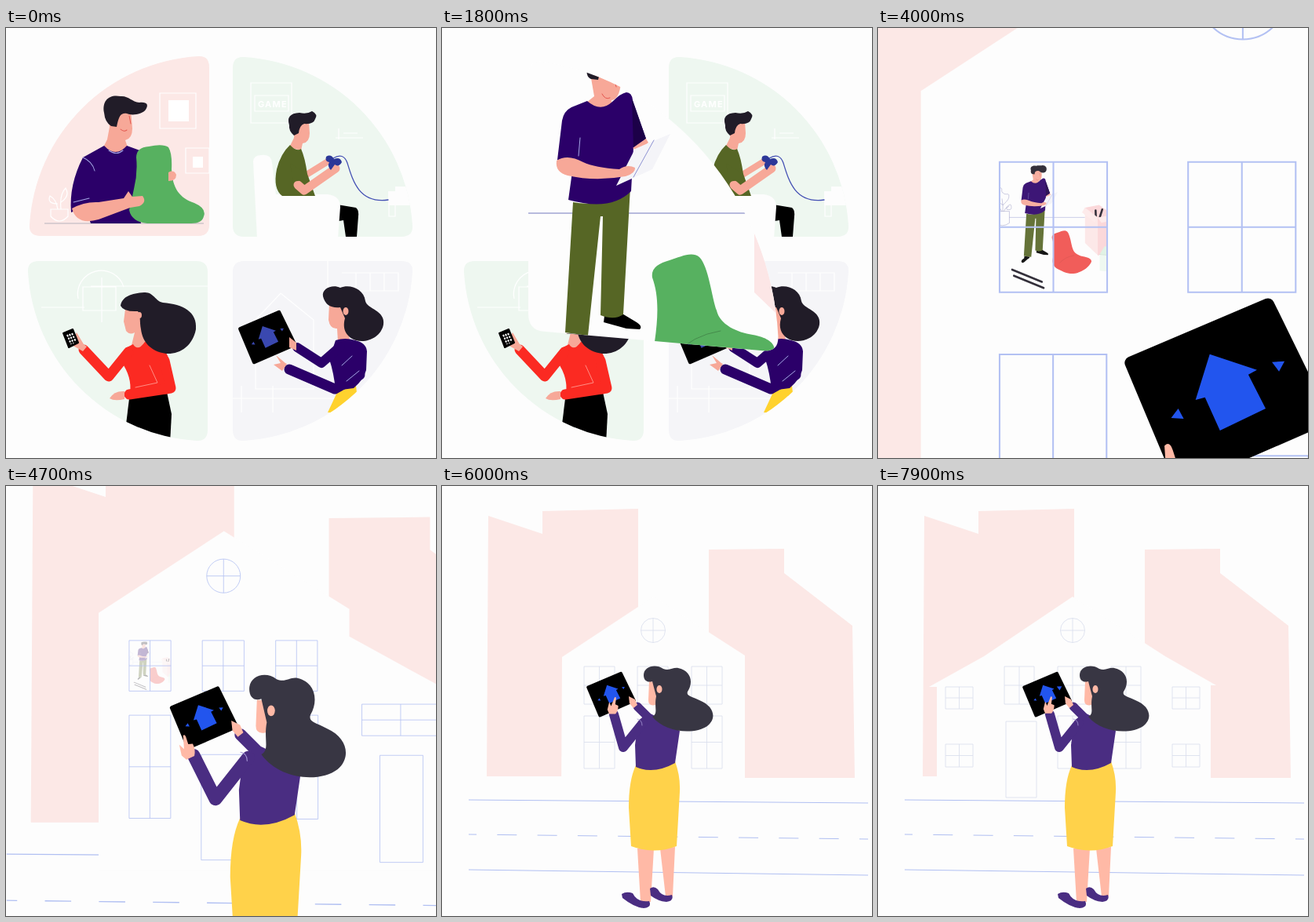
Animation of 548x548 px, one loop 8 s. Source, as an HTML page:

```html
<!DOCTYPE html>
<html lang="en">
<head>
<meta charset="utf-8">
<title>Home illustration loop</title>
<style>
html,body{margin:0;height:100%;overflow:hidden;background:#fdfdfd}
svg{display:block;width:100vw;height:100vh}
.skin{fill:#f7a898}.navy{fill:#2b0069}.hair{fill:#211c28}.olive{fill:#566625}
.pale{fill:#ffb9a6}.plum{fill:#4a2d82}.dark{fill:#383643}.paper{fill:#fdfdfd}
.line{fill:none;stroke-linecap:round;stroke-linejoin:round}
.faint{fill:none;stroke:#fff;stroke-width:1.2}
.pink{fill:#fce8e6}
</style>
</head>
<body>
<svg viewBox="0 0 548 548">
<defs>
  <path id="sector" d="M0-14V-215Q0-230-14-229A229 229 0 0 0-229-14Q-230 0-215 0H-14Q0 0 0-14Z"/>
  <clipPath id="cMain"><use href="#sector" id="mainSector"/></clipPath>
  <clipPath id="cTR"><use href="#sector" transform="translate(289 266) scale(-1 1)"/></clipPath>
  <clipPath id="cBL"><use href="#sector" transform="translate(257 297) scale(1 -1)"/></clipPath>
  <clipPath id="cBR"><use href="#sector" transform="translate(289 297) scale(-1)"/></clipPath>
  <clipPath id="cWin"><rect id="winRect"/></clipPath>

  <g id="tablet">
    <path d="M324 429L498 355 569 500 387 579Z" stroke="#000" stroke-width="16" stroke-linejoin="round"/>
    <g fill="var(--glow,#2255ee)">
      <path d="M424 418L484 438 473 444 495 487 437 515 418 473 406 476Z"/>
      <path d="M384 487L391 500 375 499Z"/>
      <path id="arrow" d="M503 428L519 427 512 440Z"/>
    </g>
  </g>

  <g id="room">
    <path d="M33 236H398" stroke="#7378bd" stroke-width="1.2"/>
    <g class="line" stroke="#55559f">
      <path d="M74 212Q76 190 71 163M74 186C60 180 52 170 56 160C58 145 42 140 46 132C48 122 62 126 66 120C75 122 64 136 76 140C84 150 98 138 98 150C99 168 86 174 76 186Z"/>
      <path d="M70 212Q64 196 44 178M62 194C60 206 40 204 38 192C38 182 26 180 19 166C22 158 34 160 40 158C46 168 38 176 54 174C64 178 62 184 62 194Z"/>
      <path d="M78 212Q80 200 98 192M90 204C86 196 92 190 104 185C108 190 110 202 104 205Z"/>
      <path class="paper" d="M45 212H100V258Q72 279 45 258Z"/>
    </g>
    <path fill="#fbd5d7" d="M398 198L454 187 508 226 506 367 449 386Z"/>
    <path class="line" stroke="#211c28" stroke-width="8" d="M440 209L441 234M466 205L457 234"/>
    <path fill="#fce6e6" d="M398 205L449 237V386L398 337Z"/>
    <path fill="#fbd5d7" d="M449 237L506 225V367L449 386Z"/>
    <path fill="#fdeaea" stroke="#fbdcdc" stroke-width=".5" d="M398 197L387 216 436 257 449 237ZM449 237L505 225 522 243 463 257Z"/>
    <path fill="#eef8f0" d="M456 382L520 389V452L456 446Z"/>
    <path fill="#b8e2c4" d="M520 389L536 356V412L520 452Z"/>
    <path fill="#dff1e3" d="M456 382L475 350 536 355 520 389Z"/>
    <path class="line" stroke="#c4d2c8" stroke-width="1.5" d="M506 352L487 387M456 382L520 389"/>
    <path class="line" stroke="#211c28" stroke-width="8" d="M111 442L228 490M118 466L235 514"/>
    <path fill="currentColor" d="M268 318C266 306 276 300 290 296C304 292 318 284 328 292C340 304 344 345 350 360C354 378 376 388 396 391C414 394 426 402 423 412C410 440 370 462 335 457C320 455 310 448 296 442C276 434 268 418 271 400C276 365 276 340 268 318Z"/>
    <path class="line" stroke="#000" stroke-opacity=".22" d="M298 416Q318 392 355 386"/>
    <path d="M159 389L181 391Q180 398 172 400L158 413Q148 418 147 409Q148 402 158 397ZM207 367L228 363 248 375Q256 380 252 384L235 383 206 375Z"/>
    <path class="olive" d="M167 222Q205 230 240 203L231 365Q220 373 202 366L205 240H202L186 392 157 388Z"/>
    <path class="skin" d="M198 56Q212 44 227 58L228 70Q226 91 216 92L217 101Q203 109 184 95L194 87 190 64Z"/>
    <path class="line" stroke="#e2574f" d="M204 84Q208 92 214 89M219 62L222 75"/>
    <path class="hair" d="M185 50C180 38 190 30 206 33C214 29 222 33 230 31C242 30 249 40 246 50C243 62 230 62 222 57C214 49 204 52 201 58L199 66 190 65C184 62 184 56 185 50Z"/>
    <path class="navy" d="M185 93Q202 108 217 94Q228 83 235 82Q242 82 243 92L260 141 244 153 241 208Q215 234 161 219L166 183 147 168 153 118Q155 106 165 101Z"/>
    <path fill="#1c0048" d="M242 90L260 141 244 152Z"/>
    <path class="line" stroke="#a5a8e6" d="M176 140L174 163"/>
    <path class="skin" d="M243 153L260 141 263 146 250 157Z"/>
    <path fill="#f4f4f8" d="M246 154L291 135 268 180 222 201Z"/>
    <path class="line" stroke="#8d92d2" d="M270 143L244 190"/>
    <path class="skin" d="M146 169Q160 160 180 171Q195 178 226 180Q236 173 246 178Q247 185 234 189Q195 196 160 188Q144 184 146 169Z"/>
  </g>
</defs>

<g id="cards">
  <g clip-path="url(#cTR)">
    <path fill="#eef7f0" d="M289 36H522V266H289Z"/>
    <path class="faint" d="M312 70H364V121H312ZM317 86H360V106H317ZM420 140H455M430 134H448M424 128V142M488 226V240H496V226"/>
    <text x="321" y="101" font-family="Inter,Arial,sans-serif" font-weight="700" font-size="11" letter-spacing="1.2" fill="#fff">GAME</text>
    <path class="paper" d="M487 208H521V226H487ZM496 202H511V209H496Z"/>
    <path d="M422 225L446 229Q450 232 449 240L447 266H433L430 245 424 246Z"/>
    <path class="paper" d="M320 268L315 170Q316 162 325 162Q338 160 339 172L344 212H410Q426 214 426 228L423 268Z"/>
    <g id="gamer">
      <path class="line" stroke="#4450b4" stroke-width="1.3" d="M417 166Q430 158 435 172C442 195 450 224 487 219"/>
      <path class="line" stroke="#f7a898" stroke-width="8" d="M378 190L412 169"/>
      <path class="skin" d="M368 120H386L387 134Q387 146 378 147L376 156 361 152 367 140Z"/>
      <path class="hair" d="M361 124Q356 109 374 108Q384 110 390 106Q398 110 394 116Q392 123 380 122Q374 124 373 134L367 137Q360 131 361 124Z"/>
      <path class="olive" d="M362 149Q370 158 376 154Q381 165 384 186L394 214H352Q340 205 345 180Q350 160 362 149Z"/>
      <path class="line" stroke="#f7a898" stroke-width="11" d="M372 200L380 207 420 179"/>
      <path class="olive" d="M362 172L384 186 383 193 366 196Z"/>
      <path fill="#2c3798" d="M408 164Q414 160 418 167Q426 164 428 171Q424 178 419 174L414 181Q409 176 412 171Q406 170 408 164Z"/>
    </g>
  </g>

  <g clip-path="url(#cBL)">
    <path fill="#eef7f0" d="M28 296H258V526H28Z"/>
    <path class="faint" d="M45 356H100M108 329H257M92 345A30 30 0 0 1 150 330M122 318V375M98 330H140V360H98Z"/>
    <path d="M158 464H205L211 492 209 530H150Z"/>
    <path class="skin" d="M152 358L150 374 153 386Q158 392 164 388L160 404 170 414 180 400 174 360Z"/>
    <path fill="#fb2a22" d="M152 408L162 403Q168 413 177 400Q200 402 207 420L208 466 157 470Q162 450 150 430Z"/>
    <path class="line" stroke="#fb2a22" stroke-width="13" d="M202 424L210 459 157 467"/>
    <path class="line" stroke="#ff8d84" d="M183 430L193 452 165 458"/>
    <path class="skin" d="M151 463V473Q138 476 132 472Q138 462 151 463Z"/>
    <path class="hair" d="M146 354C148 342 160 338 176 337C188 336 190 348 200 350C226 352 244 362 242 384C238 405 222 416 204 415C184 412 174 400 172 384C170 374 172 366 168 361Q150 362 146 354Z"/>
    <ellipse class="skin" cx="170" cy="366" rx="3" ry="4"/>
    <g id="phone">
      <path class="line" stroke="#fb2a22" stroke-width="13" d="M156 413L131 444 99 410"/>
      <path class="skin" d="M98 412L82 403 90 388 99 403 103 406Z"/>
      <path d="M73 389L85 384 92 401 80 407Z" stroke="#000" stroke-width="2" stroke-linejoin="round"/>
      <path fill="none" stroke="#fff" stroke-width="2" stroke-dasharray="2.5 1.5" d="M78 391L83 403M81 390L86 402M84 389L89 400"/>
    </g>
  </g>

  <g clip-path="url(#cBR)">
    <path fill="#f5f5f8" d="M288 296H518V526H288Z"/>
    <path class="faint" d="M410 297V340M428 312H500V335H428M446 312V335M464 312V335M482 312V335M500 312V335M318 372L350 338 392 372V460H318ZM289 472H440M300 456V490M340 456V490"/>
    <path fill="#ffd22e" d="M424 460L446 456 450 490H410Z"/>
    <path class="skin" d="M412 350L411 372Q413 384 422 383L423 400H438L434 354Z"/>
    <path class="navy" d="M420 398Q432 394 445 398Q459 401 460 412L459 436Q456 448 443 459L420 462Q418 440 412 422Z"/>
    <path class="hair" d="M404 342C402 332 416 326 426 331C438 326 456 332 458 348C460 358 484 360 481 378C478 394 460 402 446 398C434 394 428 384 432 370L426 356Q408 358 404 342Z"/>
    <ellipse class="skin" cx="433" cy="361" rx="3.500" ry="5"/>
    <g id="pad">
      <path class="line" stroke="#2b0069" stroke-width="12" d="M426 406L402 427 371 407"/>
      <use href="#tablet" style="--glow:#3a48b0" transform="matrix(.285 0 0 .285 206 261)"/>
      <path class="skin" d="M361 394L370 401 370 411 361 407Z"/>
      <path class="line" stroke="#2b0069" stroke-width="13" d="M451 442L419 460 361 435"/>
      <path class="skin" d="M358 428L352 437 341 429 350 427 344 417 356 427Z"/>
    </g>
    <path class="line" stroke="#a5a8e6" d="M428 430L441 418M434 450L450 437"/>
  </g>

  <g clip-path="url(#cMain)">
    <path class="paper" d="M0 0H548V548H0Z"/>
    <path class="pink" id="tint" d="M0 0H548V548H0Z"/>
    <g id="held">
      <path class="faint" d="M196 83H242V128H196ZM229 153H259V185H229ZM57 231H79V240Q68 252 57 240ZM66 231Q64 218 56 214Q52 224 66 224M70 231Q68 212 76 204Q82 214 70 222"/>
      <path fill="#fff" d="M207 92H233V119H207ZM238 164H251V178H238Z"/>
      <path d="M49 249H252" stroke="#b7b3bd"/>
      <g id="bust">
        <path class="skin" d="M130 112L132 126 129 142 124 152Q140 170 155 152L152 143Q161 141 161 128L159 104H140Z"/>
        <path class="line" stroke="#e2574f" d="M146 129Q150 133 154 130M157 112L159 122"/>
        <path class="hair" d="M125 108C122 92 132 84 146 87C156 86 160 94 170 95C180 94 182 98 178 104C174 110 160 112 154 109C146 108 144 112 141 126L134 125Q126 120 125 108Z"/>
        <path class="navy" d="M125 150Q140 166 154 150L176 158 166 215 172 249H108L100 228 83 235Q80 200 98 165Z"/>
        <path class="line" stroke="#a5a8e6" d="M131 156Q141 163 149 156M98 165Q110 170 113 182M86 222L106 217"/>
        <path fill="#57b160" d="M166 165Q166 152 182 151Q200 147 207 152Q212 160 211 180C212 205 222 217 240 223Q256 230 252 240Q250 249 236 249H180Q160 247 157 232Q160 220 163 205Q168 185 166 165Z"/>
        <path class="skin" d="M84 230Q100 221 118 222L150 217 156 208 161 215 174 214Q180 222 170 227L158 229 118 244Q90 252 84 230ZM207 184Q214 180 217 187Q217 195 207 195Z"/>
      </g>
    </g>
    <use href="#room" id="roomIn"/>
  </g>
</g>

<g id="world">
  <path class="paper" d="M0 0H548V548H0Z"/>
  <g id="cam">
    <g id="street">
      <path class="pink" d="M59 38L128 61V32L250 29V370H57ZM340 81L436 80V111L523 178 526 372H340Z"/>
      <g fill="none" stroke="#b0bff2" stroke-width="1">
        <path d="M34 400L543 404M34 489L543 496"/>
        <path stroke-dasharray="25 26.300" stroke-dashoffset="15" d="M34 444L543 450"/>
      </g>
      <g id="house0" transform="matrix(.744 0 0 .747 33.5 50)">
        <path class="paper" d="M118 162L278 58 438 157V192L651 308H640V490H118Z"/>
      </g>
      <path id="house1" class="paper" d="M153 218L269.500 141 386 216V395H152Z"/>
      <path id="house2" class="paper" d="M65 256L135 217 248 141 366 217 431 254H424V395H75V256Z"/>
    </g>
    <g id="roomOut"><g clip-path="url(#cWin)"><use href="#room"/></g></g>
    <g fill="none" stroke-width=".8">
      <path id="panes0" transform="matrix(.744 0 0 .747 33.5 50)" stroke="#b3c1f3"/>
      <path id="panes1" stroke="#d9deec"/>
      <path id="panes2" stroke="#d9deec"/>
    </g>
  </g>
  <g id="woman">
    <path class="pale" d="M249 462L253 530H266L270 462ZM278 462L285 523H294L297 460Z"/>
    <path class="plum" d="M229 520Q235 516 243 519Q249 531 264 529Q268 537 257 538Q245 537 230 525ZM265 513Q270 509 275 514Q281 525 293 521Q296 529 286 530Q275 529 266 522Z"/>
    <path class="pale" d="M264 249L263 273Q263 281 272 279L274 292 282 290 277 250Z"/>
    <path class="line" stroke="#4a2d82" stroke-width="11" d="M272 304L249 281"/>
    <g id="body">
      <path fill="#ffd24a" d="M247 356Q270 365 297 351Q304 370 303 390L299 459Q270 470 241 459L238 410Q238 375 247 356Z"/>
      <path class="plum" d="M258 292Q266 286 280 300L303 312 297 353Q270 368 247 358L246 330 250 300Z"/>
    </g>
    <path id="mane" class="dark" d="M257 241C257 230 272 226 282 233C290 236 294 231 301 232C317 235 321 250 313 262C311 268 318 268 328 273C348 281 350 297 338 306C322 317 285 315 268 294C276 290 270 282 273 268L268 249C262 251 257 248 257 241Z"/>
    <ellipse class="pale" cx="277" cy="259" rx="3.500" ry="5"/>
    <use href="#tablet" transform="matrix(.24 0 0 .24 108.4 153.500)"/>
    <path class="pale" id="grip" d="M238 268L246 272 249 279 244 283 239 277Z"/>
    <path class="line" id="arm" stroke="#4a2d82" stroke-width="12"/>
    <path class="line" stroke="#a79ad6" stroke-width=".8" d="M249 297Q255 298 255 305"/>
    <path class="pale" id="hand" d="M-7 2L-6-8-3-3 0-15Q2-16 2-13L2-6 6-5Q7 1 4 6L-4 7Z"/>
  </g>
</g>
</svg>
<script>
const $ = id => document.getElementById(id);
const set = (id, name, value) => $(id).setAttribute(name, value);
const fade = (id, value) => set(id, 'opacity', value);
const lerp = (a, b, p) => a + (b - a) * p;
const ramp = (t, a, b) => Math.min(1, Math.max(0, (t - a) / (b - a)));
const ease = p => p * p * (3 - 2 * p);

const box = (x, y, w, h) => `M${x} ${y}h${w}v${h}h${-w}z`;
const pane = (x, y, w, h) => box(x, y, w, h) + `M${x + w / 2} ${y}v${h}M${x} ${y + h / 2}h${w}`;
const rose = (x, y, r) => `M${x - r} ${y}a${r} ${r} 0 1 1 ${2 * r} 0a${r} ${r} 0 1 1 ${-2 * r} 0h${2 * r}M${x} ${y - r}v${2 * r}`;

set('panes0', 'd', [157, 250.4, 344].map(x => pane(x, 197, 53.3, 64.3)).join('') +
  pane(157, 292, 53, 131) + pane(344, 292, 54, 132) + pane(454, 278, 99, 40) +
  box(249, 342, 61, 134) + box(477, 343, 55, 136) + rose(277.5, 115, 21.5));
set('panes1', 'd', [181, 249, 318].map(x => pane(x, 230, 39, 48)).join('') +
  pane(181, 293, 39, 67) + pane(318, 293, 39, 67) + rose(269, 184, 15.5));
set('panes2', 'd', [161, 229, 297].map(x => pane(x, 230, 38, 48)).join('') +
  [86, 375].map(x => pane(x, 256, 35, 28) + pane(x, 329, 35, 29)).join('') +
  pane(229, 293, 38, 67) + pane(297, 293, 38, 67) + box(163, 300, 39, 97) + rose(248, 184, 15.5));

// Camera: log zoom l, scaling about a slowly drifting point
const START = 2.37;
function camera(l) {
  const a = l - .296, b = a * (l - 1.239), k = Math.exp(l);
  return [k, (131 + 18.45 * a - 4.17 * b) * (1 - k), (198 + 10.5 * a - 1.74 * b) * (1 - k)];
}
const matrix = ([k, x, y]) => `matrix(${k} 0 0 ${k} ${x} ${y})`;
const [k0, x0, y0] = camera(START);
set('roomOut', 'transform', matrix([1 / k0, -x0 / k0, -y0 / k0]));

function drawCards(t) {
  const p = ease(ramp(t, 950, 1800)), q = ramp(t, 1800, 2350) ** 1.5;
  const x = lerp(lerp(259, 110, p), -40, q), y = lerp(lerp(265, 385, p), 620, q);
  const grow = end => lerp(lerp(1, end, p), 4.6, q);
  set('mainSector', 'transform',
    `translate(${x} ${y}) skewY(${5 * p}) scale(${grow(1.39)} ${grow(1.5)}) rotate(${90 * p})`);
  const swap = ramp(t, 1150, 1450);
  fade('tint', 1 - ramp(t, 1000, 1500));
  fade('held', 1 - swap);
  fade('roomIn', swap);
  set('held', 'transform', `translate(${58 * p} ${-50 * p})`);
  set('roomIn', 'transform', `translate(${-58 * (1 - p)} ${50 * (1 - p)})`);
  const sway = Math.sin(t * Math.PI / 450);
  set('bust', 'transform', `rotate(${.6 * sway} 140 249)`);
  set('gamer', 'transform', `rotate(${.4 * sway} 370 212)`);
  set('phone', 'transform', `rotate(${1.2 * sway} 156 413)`);
  set('pad', 'transform', `rotate(${.9 * sway} 440 420)`);
}

function drawWorld(t) {
  const l = START * (1 - ramp(t, 3500, 5450)) ** 2.18;
  set('cam', 'transform', matrix(camera(l)));
  const k = Math.exp(1.11 * l + .035 * l * l);
  set('woman', 'transform', matrix([k, (114.2 + 23.5 * l) * (1 - k), (184.6 + 14.8 * l) * (1 - k)]));

  const shut = ramp(t, 3550, 3850);
  set('winRect', 'x', 61 * shut);
  set('winRect', 'y', 17 * shut);
  set('winRect', 'width', lerp(548, 422, shut));
  set('winRect', 'height', lerp(548, 512, shut));
  fade('roomOut', 1 - ramp(t, 3900, 5000));
  fade('street', shut);

  const first = ramp(t, 5600, 5900), second = ramp(t, 6700, 7000);
  [1 - first, first * (1 - second), second].forEach((o, i) => {
    fade('house' + i, o);
    fade('panes' + i, i ? o : o * shut);
  });

  // She settles from a raised pose into tapping the tablet
  const reach = ease(ramp(t, 5000, 5600)), lift = 1 - reach;
  const hx = lerp(206, 219, reach), hy = lerp(300, 291, reach);
  const tap = [5600, 6700, 7850].reduce((s, c) => s + Math.max(0, 1 - Math.abs(t - c) / 160), 0);
  set('arm', 'd', `M256 302L${lerp(226, 231, reach)} ${lerp(340, 333, reach)}L${hx} ${hy}`);
  set('hand', 'transform', `translate(${hx - lerp(5, 1, reach)} ${hy - 7 * reach - 4 * lift - tap}) rotate(${lerp(-18, 8, reach)})`);
  set('grip', 'transform', `translate(${2.5 * lift} 0)`);
  set('body', 'transform', `translate(${1.5 * lift} ${1.5 * lift})`);
  const stretch = 1 + .13 * lift;
  set('mane', 'transform', `translate(0 ${255 * (1 - stretch)}) scale(1 ${stretch})`);
  const s = 1 + tap;
  set('arrow', 'transform', `translate(${511 * (1 - s)} ${432 * (1 - s)}) scale(${s})`);
}

function frame(now) {
  const t = now % 8000, inside = t < 2500;
  const red = ramp(t, 3050, 3400);
  document.querySelector('svg').style.color =
    `rgb(${lerp(87, 240, red)},${lerp(177, 78, red)},${lerp(96, 74, red)})`;
  $('cards').style.display = inside ? '' : 'none';
  $('world').style.display = inside ? 'none' : '';
  if (inside) set('arrow', 'transform', '');
  (inside ? drawCards : drawWorld)(t);
  requestAnimationFrame(frame);
}
requestAnimationFrame(frame);
</script>
</body>
</html>
```
